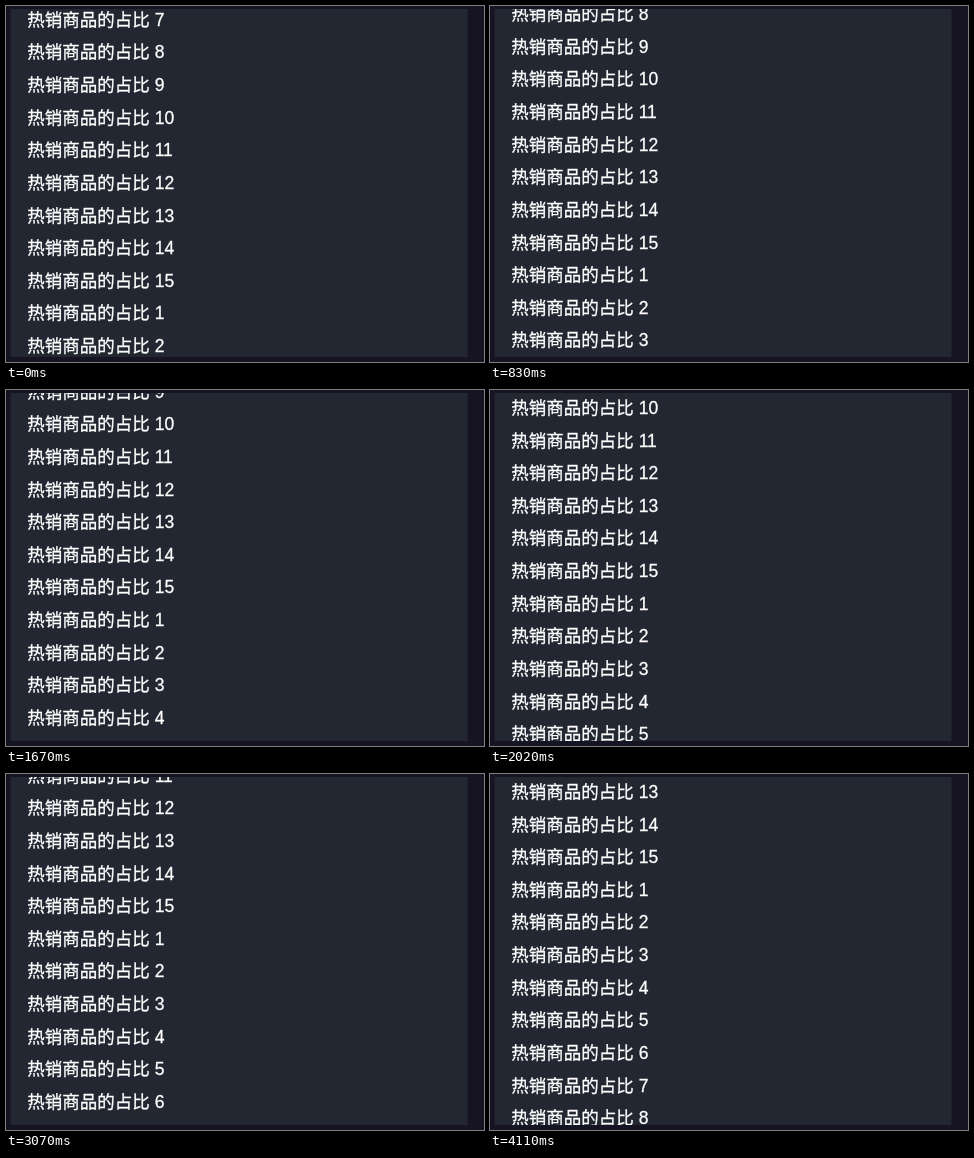
Write an HTML page with a canvas that moves like this. It is 478 by 356 pixels and loops after 4180 ms.

```html
<!DOCTYPE html>
<html lang="zh-CN">
<head>
<meta charset="utf-8">
<title>Scrolling list</title>
<style>
html, body { margin: 0; width: 100%; height: 100%; overflow: hidden; background: #161422; }
canvas { display: block; }
</style>
</head>
<body>
<canvas id="stage" width="478" height="356"></canvas>
<script>
const ctx = document.getElementById('stage').getContext('2d');
const LOOP = 4180, PITCH = 32.62, ITEMS = 15, FIRST = 7;
const PANEL = [4.5, 3, 457, 348];

// Ticks last 70 ms, apart from two short ones of 60 ms.
function tickAt(t) {
  return Math.floor((t + (t >= 270 ? 10 : 0) + (t >= 3200 ? 10 : 0)) / 70);
}

function draw(t) {
  const shift = Math.max(0, tickAt(t) * PITCH / 10 - 0.9);
  ctx.fillStyle = '#161422';
  ctx.fillRect(0, 0, 478, 356);
  ctx.fillStyle = '#232731';
  ctx.fillRect(...PANEL);
  ctx.save();
  ctx.beginPath();
  ctx.rect(...PANEL);
  ctx.clip();
  ctx.fillStyle = ctx.strokeStyle = '#fff';
  ctx.lineWidth = 0.3;
  ctx.font = '17.5px "Liberation Sans", Arial, "Noto Sans CJK SC", "Noto Sans CJK", sans-serif';
  for (let i = 0; i < 18; i++) {
    const baseline = Math.round(13.8 + i * PITCH - shift) + 6;
    const label = '热销商品的占比 ' + ((FIRST - 1 + i) % ITEMS + 1);
    ctx.fillText(label, 21.3, baseline);
    ctx.strokeText(label, 21.3, baseline);
  }
  ctx.restore();
}

const start = performance.now();
function loop() {
  draw((performance.now() - start) % LOOP);
  requestAnimationFrame(loop);
}
loop();
</script>
</body>
</html>
```
